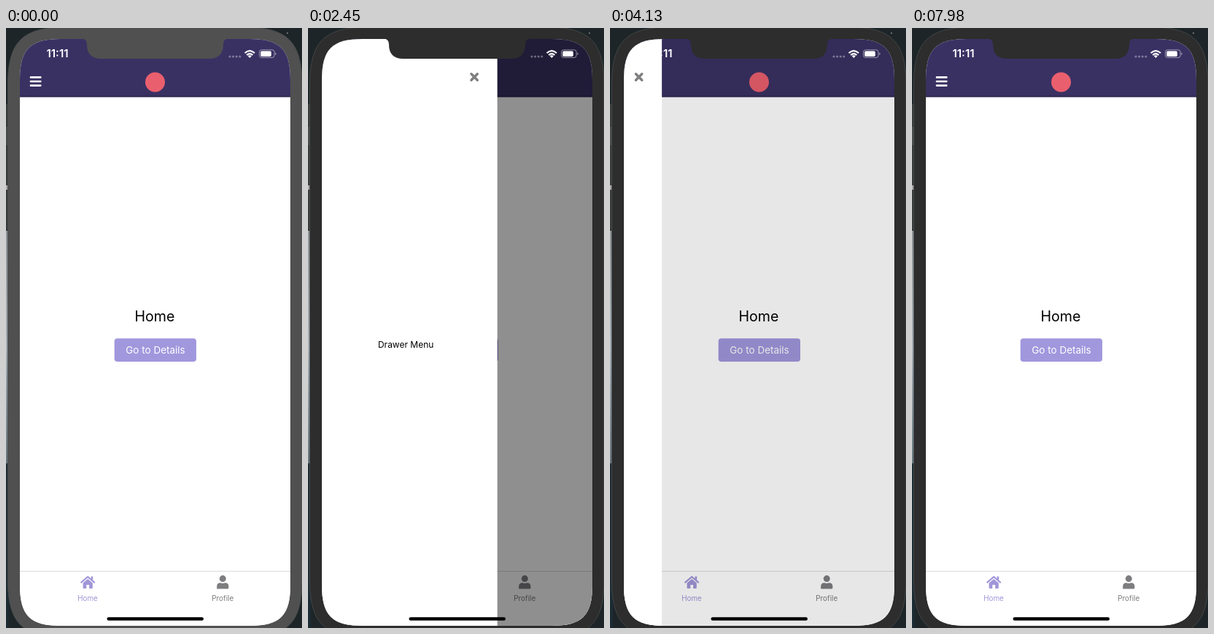
These frames come from a looping animation (406 px wide and 820 px high, 8 s). An HTML page:

```html
<!DOCTYPE html>
<html lang="en">
<head>
<meta charset="utf-8">
<title>App navigation</title>
<style>
  @property --open { syntax: "<number>"; inherits: true; initial-value: 0; }
  @property --push { syntax: "<number>"; inherits: true; initial-value: 0; }

  html, body { margin: 0; width: 100%; height: 100%; overflow: hidden; background: #1d2528; }
  svg {
    display: block; width: 406px; height: 820px;
    font-family: Inter, Roboto, sans-serif;
    animation: open 8s infinite, push 8s infinite;
  }

  .title { font-size: 19.6px; }
  .label { font-size: 13.5px; fill: #fff; }
  .tab { font-size: 9.9px; }
  .mid { text-anchor: middle; }
  .line { fill: none; stroke-linecap: round; stroke-linejoin: round; }

  #home { transform: translateX(calc(var(--push) * -111px)); }
  #details { transform: translateX(calc((1 - var(--push)) * 377px)); }
  #homeBar { opacity: calc(1 - var(--push)); }
  #detailsBar { opacity: var(--push); }
  #shade { opacity: calc(var(--open) * .46); }
  #drawer { transform: translateX(calc((var(--open) - 1) * 251px)); }

  .body { animation: focus 8s infinite step-end; }
  #menu { animation: pressMenu 8s infinite linear; }
  #go { animation: pressGo 8s infinite linear; }
  #back { animation: pressBack 8s infinite linear; }

  @keyframes open {
    0% { --open: 0; }
    26.5625% { --open: 0; animation-timing-function: cubic-bezier(.15, .5, .2, 1); }
    32.8125% { --open: 1; }
    49.475% { --open: 1; animation-timing-function: cubic-bezier(.15, .5, .2, 1); }
    55.725%, 100% { --open: 0; }
  }
  @keyframes push {
    0% { --push: 0; }
    68.5% { --push: 0; animation-timing-function: cubic-bezier(.2833, .99, .31833, .99); }
    74.75% { --push: 1; }
    92.5% { --push: 1; animation-timing-function: cubic-bezier(.2833, .99, .31833, .99); }
    98.75%, 100% { --push: 0; }
  }
  @keyframes focus {
    0% { fill: #505050; }
    24.5%, 100% { fill: #2d2d2d; }
  }
  @keyframes pressMenu {
    0%, 24.5%, 30.375%, 100% { opacity: 1; }
    26.375%, 27.25% { opacity: .2; }
  }
  @keyframes pressGo {
    0%, 64.875%, 71.875%, 100% { opacity: 1; }
    66.75%, 68.75% { opacity: .2; }
  }
  @keyframes pressBack {
    0%, 89.25%, 95.625%, 100% { opacity: 1; }
    91%, 92.5% { opacity: .2; }
  }
</style>
</head>
<body>
<svg viewBox="0 0 406 820">
  <defs>
    <!-- corners ease into the straight edges -->
    <clipPath id="screen">
      <path d="M19 71c0-42 14-56 56-56h259c42 0 56 14 56 56v690c0 42-14 56-56 56h-259c-42 0-56-14-56-56z"/>
    </clipPath>
    <linearGradient id="cool" x2="0" y2="1">
      <stop stop-color="#8c9294"/><stop offset=".5" stop-color="#a3abb2"/><stop offset="1" stop-color="#66767e"/>
    </linearGradient>
    <linearGradient id="edge">
      <stop stop-opacity="0"/><stop offset="1" stop-opacity=".14"/>
    </linearGradient>
  </defs>

  <!-- desktop behind the phone -->
  <rect width="406" height="820" fill="#1d2528"/>
  <rect y="104" width="4" height="172" fill="#383a3b"/>
  <rect y="135" width="4" height="25" fill="#4a4c4d"/>
  <rect y="215" width="4" height="6" fill="#a8a8a8"/>
  <rect y="277" width="4" height="318" fill="url(#cool)"/>
  <rect y="595" width="4" height="225" fill="#1c2c34"/>
  <circle cx="386" cy="7" r=".8" fill="#ccc"/>

  <path class="body" stroke="#4a4d4f" stroke-width=".8"
        d="M2.5 77c0-58 20-78 78-78h247.5c58 0 78 20 78 78v678c0 58-20 78-78 78h-247.5c-58 0-78-20-78-78z"/>

  <g clip-path="url(#screen)">
    <rect x="19" y="15" width="371" height="802" fill="#fff"/>

    <g id="home">
      <rect x="19" y="94" width="371" height="648" fill="#fff"/>
      <text class="title mid" x="204" y="401">Home</text>
      <g id="go">
        <rect x="148.7" y="424.3" width="112.3" height="31.7" rx="4" fill="#a197dd"/>
        <text class="label mid" x="205" y="445.2">Go to Details</text>
      </g>
    </g>

    <g id="details">
      <rect x="13" y="94" width="6" height="648" fill="url(#edge)"/>
      <rect x="19" y="94" width="371" height="648" fill="#fff"/>
      <text class="title mid" x="204" y="401">Details (from Home)</text>
      <g id="back">
        <rect x="162.7" y="424.3" width="83.6" height="31.7" rx="4" fill="#f45b7a"/>
        <text class="label mid" x="204.5" y="445.2">Go Back</text>
      </g>
    </g>

    <!-- header -->
    <rect x="19" y="15" width="371" height="79.3" fill="#3a3163"/>
    <rect x="19" y="92.8" width="371" height="1.5" fill="#2a234c"/>
    <g id="homeBar">
      <path id="menu" class="line" d="M34 67.4H47.3M34 73H47.3M34 78.6H47.3" stroke="#fff" stroke-width="2.7"/>
      <circle cx="204.5" cy="74" r="13.5" fill="#ea5f6e"/>
    </g>
    <g id="detailsBar" fill="#fff">
      <path class="line" d="M37.6 66L29.4 74L37.6 82" stroke="#fff" stroke-width="2.8"/>
      <text x="44.5" y="79.2" font-size="14.4">Home</text>
      <text class="mid" x="204.5" y="79.4" font-size="15" font-weight="600">Details</text>
    </g>

    <!-- tab bar -->
    <rect x="19" y="742" width="371" height="75" fill="#fff"/>
    <rect x="19" y="742" width="371" height="1" fill="#dcdcde"/>
    <g fill="#a196d8">
      <path class="line" d="M103.3 757.6L112.2 750L121.1 757.6" stroke="#a196d8" stroke-width="2.2"/>
      <path d="M116.6 749.5h2.6v5.2l-2.6-2.2zM112.2 753l6.6 5.6v6.6q0 .8-.8.8h-3.9v-5h-3.8v5h-3.9q-.8 0-.8-.8v-6.6z"/>
      <text class="tab mid" x="112" y="782.8">Home</text>
    </g>
    <g fill="#7d7d80">
      <circle cx="297.3" cy="752.6" r="4.5"/>
      <path d="M289.2 766.5v-3.2q0-5 5-5q3.1 1.3 6.2 0q5 0 5 5v1.7q0 1.5-1.5 1.5z"/>
      <text class="tab mid" x="297.2" y="782.8">Profile</text>
    </g>

    <rect id="shade" x="19" y="15" width="371" height="802"/>

    <g id="drawer">
      <rect x="19" y="15" width="251" height="802" fill="#fff"/>
      <path class="line" d="M234.3 62.8L242.7 71.2M242.7 62.8L234.3 71.2" stroke="#7f7f7f" stroke-width="3.4"/>
      <text class="mid" x="144.5" y="437.3" font-size="12">Drawer Menu</text>
    </g>

    <!-- status bar -->
    <g fill="#fff">
      <text class="mid" x="70.5" y="40.3" font-size="15" font-weight="600">11:11</text>
      <path class="line" d="M307 39H321" stroke="#fff" stroke-opacity=".35" stroke-width="3.2" stroke-dasharray="0 4.6"/>
      <path d="M327.6 34.3Q334.3 28 341 34.3M330.2 37Q334.3 33.2 338.4 37" fill="none" stroke="#fff" stroke-width="2.2"/>
      <path d="M331.7 38.3Q334.3 36.2 336.9 38.3L334.3 41z"/>
      <rect x="347.5" y="29.9" width="20.6" height="10.6" rx="3" fill="none" stroke="#fff" stroke-opacity=".5"/>
      <rect x="349.2" y="31.5" width="14.6" height="7.4" rx="1.6"/>
      <path d="M369.3 33.4q1.4.5 1.4 1.8t-1.4 1.8z" opacity=".5"/>
    </g>
    <rect x="138.5" y="805.2" width="132.5" height="4.6" rx="2.3"/>
  </g>

  <!-- notch -->
  <path class="body" d="M103 14.5Q111 14.5 111 22.5Q111 42 130.5 42H278.5Q298 42 298 22.5Q298 14.5 306 14.5V13H103z"/>
</svg>
</body>
</html>
```
